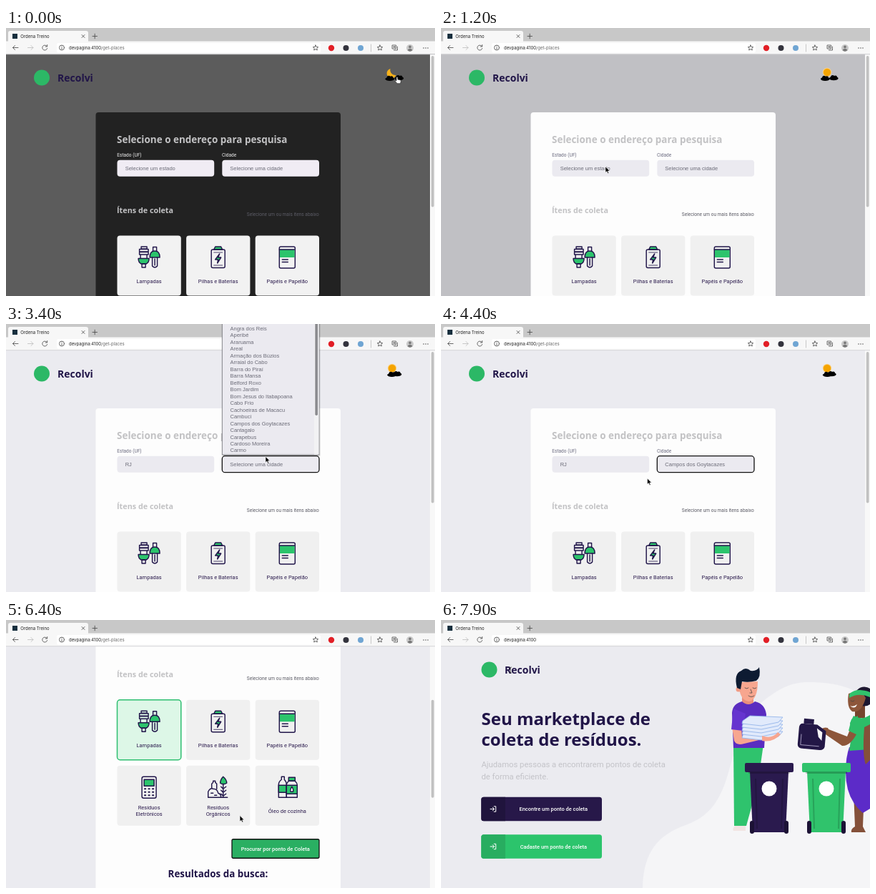
An HTML page for the animation above (8 s loop, 600 by 375 pixels).

```html
<!DOCTYPE html>
<html lang="pt-BR">
<head>
<meta charset="utf-8">
<title>Pontos de coleta</title>
<style>
html, body { margin: 0; width: 100%; height: 100%; overflow: hidden; }
svg { display: block; width: 100vw; height: 100vh; font-family: Roboto, sans-serif; }
.h { font-family: "Open Sans", sans-serif; font-weight: 700; fill: #211548; }
.soft { fill: #c2c2c4; }
.ui { font: 6px Inter, sans-serif; fill: #222; }
.small { font-size: 6.55px; }
.label { fill: #6c6c80; }
.field { font: 7.5px "Liberation Sans", Arial, sans-serif; fill: #6c6c78; }
.box { fill: #ebeaf0; stroke-width: 1.3; }
.focus { stroke: #111; }
.tile { fill: #f0f0f0; stroke-width: 1.5; }
.tile.on { fill: #ddf7e7; stroke: #2fbf71; }
.name { font-size: 7.5px; fill: #2a1a4c; text-anchor: middle; }
.btn { font-size: 7.45px; font-weight: 500; fill: #fff; text-anchor: middle; }
.icon { fill: none; stroke: #21164a; stroke-width: 1.45; stroke-linejoin: round; stroke-linecap: round; }
.icon .g { fill: #2cc46c; }
.line { fill: none; stroke: #444; stroke-width: .8; stroke-linecap: round; stroke-linejoin: round; }
#panel { fill: #fdfdfd; }
.dark #panel { fill: #222; }
.dark .label { fill: #eee; }
.dark .box { fill: #f0ecf4; }
.dark .tile { fill: #f2f2f2; }
</style>
</head>
<body>
<svg id="stage" viewBox="0 0 600 375" preserveAspectRatio="none">
  <defs>
    <g id="cloud"><ellipse rx="6.3" ry="2.7"/><circle cx="-1.5" cy="-2" r="2.6"/><circle cx="2.3" cy="-1.6" r="2.4"/></g>
    <g id="enter" fill="none" stroke="#fff" stroke-linecap="round" stroke-linejoin="round"><path d="M-4 0H1.5M-.8 -2.3L1.5 0L-.8 2.3M1.2 -3.7H3.7V3.7H1.2"/></g>
    <g id="bin">
      <path d="M-27 12H27L23 97H-23Z"/><rect x="-34" width="68" height="13" rx="2"/>
      <path d="M-29 12H29V15H-29Z" fill="#000" opacity=".2"/>
      <path d="M-19 22L-17 92M19 22L17 92" fill="none" stroke="#000" stroke-opacity=".17" stroke-width="2"/>
      <rect x="-27" y="81" width="6" height="18" rx="3" fill="#1c1235"/><rect x="21" y="81" width="6" height="18" rx="3" fill="#1c1235"/>
      <circle cy="36" r="10.5" fill="#fff"/>
    </g>
  </defs>
  <rect id="bg" width="600" height="375"/>

  <g id="find">
    <g id="page">
      <circle cx="50" cy="69.5" r="11" fill="#2cb866"/>
      <text class="h" x="72" y="75" font-size="14">Recolvi</text>
      <path id="moon" d="M537.5 57A6.7 6.7 0 1 0 545.5 66A7.3 7.3 0 0 1 537.5 57Z" fill="#f7b21b"/>
      <g id="sun"><circle cx="540" cy="62" r="6.2" fill="#fbd080"/><circle cx="540" cy="62" r="5.2" fill="#f5a400"/></g>
      <use id="cloudL" href="#cloud" y="71.3"/><use id="cloudR" href="#cloud" y="70.5"/>

      <rect id="panel" x="125.5" y="118" width="342.5" rx="4"/>
      <text class="h soft" x="155" y="161" font-size="13.47">Selecione o endereço para pesquisa</text>
      <text class="small label" x="155.3" y="179.5">Estado (UF)</text>
      <text class="small label" x="302" y="179.5">Cidade</text>
      <rect id="box1" class="box" x="155.5" y="184.7" width="135.7" height="23" rx="4"/>
      <rect id="box2" class="box" x="302.3" y="184.7" width="135.7" height="23" rx="4"/>
      <text id="value1" class="field" x="166.7" y="199"></text>
      <text id="value2" class="field" x="313.3" y="199"></text>
      <text class="h soft" x="155" y="259" font-size="10.8">Ítens de coleta</text>
      <text class="small" x="336.8" y="262.5" fill="#5c5c66">Selecione um ou mais itens abaixo</text>
      <g id="tiles"></g>
      <rect id="search" x="316" y="485.5" width="122" height="26.5" rx="2" fill="#2aaf62" stroke-width="1.3"/>
      <text class="btn" x="376.7" y="501.5">Procurar por ponto de Coleta</text>
      <g id="results" text-anchor="middle">
        <text class="h" x="296.5" y="538.5" font-size="13.4">Resultados da busca:</text>
        <rect x="158" y="558.5" width="108" height="120" rx="5" fill="#ebebf0"/>
        <rect x="327.5" y="558.5" width="108" height="120" rx="5" fill="#ebebf0"/>
        <text class="h" x="212" y="573.2" font-size="8.8">Mercado Tovia</text>
        <text class="h" x="381.5" y="573.2" font-size="8.8">Mercado Tovia</text>
      </g>
    </g>
    <rect x="593" y="37" width="7" height="338" fill="#f8f8f8"/>
    <rect id="thumb" x="594.8" width="3.8" rx="1.9" fill="#c1c1c1"/>
  </g>

  <g id="home">
    <path d="M282 375C283 325 303 301 342 287C391 270 398 228 410 184C420 146 436 122 462 105C480 92 496 87 514 87C555 87 584 96 600 117V375Z" fill="#f5f5f7"/>
    <circle cx="67.5" cy="69.5" r="11" fill="#2cb866"/>
    <text class="h" x="89" y="75" font-size="14">Recolvi</text>
    <g class="h" font-size="24"><text x="56.5" y="147">Seu marketplace de</text><text x="56.5" y="176">coleta de resíduos.</text></g>
    <g font-size="11.25" fill="#c3c3c8"><text x="56.5" y="206">Ajudamos pessoas a encontrarem pontos de coleta</text><text x="56.5" y="223.3">de forma eficiente.</text></g>
    <rect x="56.3" y="247.7" width="168.7" height="33.6" rx="3.500" fill="#271849"/>
    <path d="M90 247.7H59.8A3.500 3.500 0 0 0 56.3 251.200V277.800A3.500 3.500 0 0 0 59.8 281.3H90Z" fill="#20143d"/>
    <rect x="56.3" y="300.2" width="168.7" height="33.6" rx="3.500" fill="#2cc46c"/>
    <path d="M90 300.2H59.8A3.500 3.500 0 0 0 56.3 303.700V330.300A3.500 3.500 0 0 0 59.8 333.8H90Z" fill="#28ad60"/>
    <use href="#enter" x="73" y="264.5"/><use href="#enter" x="73" y="317"/>
    <text class="btn" x="157.3" y="267.2">Encontre um ponto de coleta</text>
    <text class="btn" x="157.3" y="319.7">Cadaste um ponto de coleta</text>

    <!-- man -->
    <path d="M409 174H451L443 230L427 288H410Z" fill="#2fc36d"/>
    <path d="M411 288H426V295H409Q407 292 411 288Z" fill="#f1e4e2"/>
    <path d="M421 101H437V119H421Z" fill="#e98f7c"/>
    <path d="M421 114Q408 117 407 130L409 179H452L455 132Q453 117 439 114Q430 122 421 114Z" fill="#5a2cc0"/>
    <path d="M416 87Q417 113 431 114Q443 111 443 86Z" fill="#f7a68f"/>
    <circle cx="416" cy="97" r="3.500" fill="#f29c86"/>
    <path d="M414 95Q409 75 420 71Q426 65 433 71Q442 72 445 66Q448 80 441 85Q430 88 421 86L419 97Z" fill="#0d1b32"/>
    <path d="M425 95Q428 97 430 95M436 95Q439 97 441 95M430 106Q434 109 438 106M433 97L435 102H432" class="line"/>
    <path d="M407 150L410 169Q413 176 424 173L449 167L448 159L421 163L420 150Z" fill="#f7a68f"/>
    <path d="M409 124L406 153L422 155L426 131Z" fill="#6534cf"/>
    <g id="papers" stroke="#96b6ea" stroke-width=".9" fill="#e1eafb"></g>
    <path d="M449 162Q463 167 471 157L475 160Q464 172 449 169Z" fill="#f7a68f"/>

    <!-- woman -->
    <path d="M577 240H592L590 289L594 297H574Q573 292 579 289Z" fill="#84503a"/>
    <path d="M571 178H600V264L590 270Q566 250 566 213Q566 192 571 178Z" fill="#5c2bc8"/>
    <path d="M579 116H593V137H579Z" fill="#76442d"/>
    <circle cx="592" cy="107" r="13.500" fill="#1d1730"/>
    <path d="M570 103Q567 122 575 128Q588 131 594 109L587 98Z" fill="#8d563a"/>
    <path d="M571 104Q580 94 600 101V108Q584 101 571 109Z" fill="#30c36c"/>
    <path d="M573 113Q576 115 578 113" class="line"/>
    <path d="M572 120Q577 122 582 118Q579 126 572 120Z" fill="#fff"/>
    <path d="M577 134Q588 141 600 133V181L571 183Q575 160 572 144Z" fill="#2dbd68"/>
    <path d="M575 146L568 163L537 151L532 156L561 176Q573 177 583 156Z" fill="#8d563a"/>
    <path d="M583 134L574 139L570 155L583 161Z" fill="#2dbd68"/>
    <path d="M592 150L600 146V196L594 202Q589 190 592 150Z" fill="#84503a"/>
    <path d="M530 157Q532 149 541 151L544 157L534 162Z" fill="#8d563a"/>
    <g fill="#231746" transform="rotate(5 520 161)">
      <path d="M506 139H520V146H506Z"/><path d="M504 146H525L538 154V176Q537 181 531 181H505Q500 180 500 175V152Q500 147 504 146Z"/>
      <path d="M525 151L533 156V168L528 163Z" fill="#f5f5f7"/><path d="M504 161V176H530" fill="none" stroke="#cfc8e6" stroke-width=".7"/>
    </g>
    <use href="#bin" x="459" y="200" fill="#2a1a4e"/>
    <use href="#bin" x="539" y="200" fill="#30c36c"/>
  </g>

  <!-- browser frame -->
  <rect width="600" height="19" fill="#c8c8c8"/>
  <rect y="18.500" width="600" height="18" fill="#f7f7f7"/>
  <rect y="36.300" width="600" height=".9" fill="#d2d2d4"/>
  <path d="M3 19V7Q3 4 6 4H112Q115 4 115 7V19Z" fill="#f7f7f7"/>
  <rect x="9" y="8" width="7" height="7" fill="#17303f"/>
  <text class="ui" x="20.3" y="13.7">Ordena Treino</text>
  <path class="line" d="M106 9.5L110 13.5M110 9.5L106 13.5M121 11.5H127.500M124.200 8.200V14.800"/>
  <rect x="71" y="21" width="369" height="13.500" rx="2.500" fill="#fff"/>
  <text class="ui" x="88" y="30"><tspan>devpagina:4100</tspan><tspan id="path" fill="#666">/get-places</tspan></text>
  <path class="line" d="M17 27.500H9.500M12.500 24.500L9.500 27.500L12.500 30.500M57 25.300A3.500 3.500 0 1 0 57.700 28.500M57.700 23.500V26H55.200M78 27.200V29.500M78 25.600V25.700"/>
  <path class="line" style="stroke:#bbb" d="M30.500 27.500H38M35 24.500L38 27.500L35 30.500M510.500 23V33"/>
  <circle class="line" cx="78" cy="27.500" r="3.500"/>
  <path id="star" class="line" d="M433 24L434.100 26.400L436.700 26.700L434.800 28.400L435.300 31L433 29.700L430.700 31L431.200 28.400L429.300 26.700L431.900 26.400Z"/>
  <use href="#star" x="90"/>
  <circle cx="455" cy="28" r="4.200" fill="#e21f26"/>
  <circle cx="475.500" cy="28" r="4" fill="#33333d"/>
  <circle cx="496" cy="28" r="4" fill="#6fa5d3"/>
  <path class="line" d="M540.500 24H545.500V29H540.500ZM542.500 31H547.500V26M543 25.300V27.700M541.800 26.500H544.200"/>
  <circle cx="565" cy="28" r="5" fill="#c9c9c9"/><circle cx="565" cy="26.400" r="1.800" fill="#777"/><path d="M561.500 31Q565 26.500 568.500 31Q565 34.500 561.500 31Z" fill="#777"/>
  <path d="M584 28h.01M587 28h.01M590 28h.01" stroke="#333" stroke-width="1.300" stroke-linecap="round"/>

  <g id="list">
    <rect x="1.500" y="-3" width="136" height="187.500" opacity=".15"/>
    <rect x=".3" y="-2" width="135.600" height="185" fill="#ebeaf0" stroke="#77777c" stroke-width=".9"/>
    <rect id="hover" x=".8" width="128.200" height="9.500" fill="#c4c4c6"/>
    <g id="items"></g>
    <path d="M129 0V182.500H135.500V0Z" fill="#f2f2f4"/>
    <rect x="130.300" y="-3" width="3.700" height="131" rx="1.800" fill="#8c8c90"/>
  </g>

  <g id="cursor" stroke="#fff" stroke-width=".6">
    <path id="arrow" d="M0 0V8.300L1.900 6.600L3.300 9.500L4.700 8.900L3.400 6.100H6Z"/>
    <path id="hand" d="M-1 0Q0 -1.200 .9 0V3L4.400 3.800Q5.600 4.200 5.300 5.600L4.600 8.700H.2L-2.800 5.400Q-2.600 4 -1 5Z" fill="#fff" stroke="#111"/>
    <path id="beam" d="M-1.700 -4Q0 -4 0 -2.800V2.800Q0 4 -1.700 4M1.700 -4Q0 -4 0 -2.800M0 2.800Q0 4 1.700 4" fill="none" stroke="#222" stroke-width=".8"/>
  </g>
</svg>

<script>
const $ = id => document.getElementById(id);
const set = (id, attrs) => { for (const k in attrs) $(id).setAttribute(k, attrs[k]); };
const show = (id, on) => { $(id).style.display = on ? '' : 'none'; };
const clamp = x => Math.max(0, Math.min(1, x));
const ease = x => { x = clamp(x); return x * x * (3 - 2 * x); };

const LOOP = 8000, STEP = 100, ROW = 9.47, DEPTH = 199.5;
const states = 'RO AC AM RR PA AP TO MA PI CE RN PB PE AL SE BA MG ES RJ'.split(' ');
const cities = ('Angra dos Reis,Aperibé,Araruama,Areal,Armação dos Búzios,Arraial do Cabo,Barra do Piraí,' +
  'Barra Mansa,Belford Roxo,Bom Jardim,Bom Jesus do Itabapoana,Cabo Frio,Cachoeiras de Macacu,' +
  'Cambuci,Campos dos Goytacazes,Cantagalo,Carapebus,Cardoso Moreira,Carmo').split(',');

// Each icon is centred on 0,0.
const tiles = [
  [['Lampadas'], `<path d="M-11 -15H-3V-12H-11ZM-13.500 -11.500H-1V-8H-13.500ZM-13.500 -7.500H-1V-4H-13.500ZM-12 -3.500V1M-3 -3.500V1"/>
    <path class="g" d="M-15 1.500H0Q0 7 -4 9H-11Q-15 7 -15 1.500Z"/><path d="M-10 9H-5V14H-10Z"/>
    <path class="g" d="M1 0Q1 -9 8 -9T15 0Z"/><path d="M5.500 -9V-14.500H10.500V-9M4.500 0V12Q8 16 11.500 12V0M8 2V11"/>`],
  [['Pilhas e Baterias'], `<path class="g" d="M-4 -15H4L6 -11H-6Z"/><rect x="-9.500" y="-11" width="19" height="25.500" rx="2"/>
    <path stroke-width=".8" d="M-6 -7H6M-6 11H6"/><path class="g" d="M2 -5L-4 3H0L-1 8L4 0H0Z"/>`],
  [['Papéis e Papelão'], `<rect x="-11" y="-15" width="22" height="30" rx="2"/>
    <path class="g" stroke="none" d="M-10.300 -11H10.300V0H-10.300Z"/><path d="M-7 3H1M-7 6.500H1M-11 -11H10"/>`],
  [['Resíduos', 'Eletrônicos'], `<rect x="-10" y="-15" width="20" height="30" rx="2.500"/><path class="g" d="M-7 -11H7V-2H-7Z"/>
    <path stroke-width="2.200" d="M-6 2h1M-.500 2h1M5 2h1M-6 6.500h1M-.500 6.500h1M5 6.500h1M-6 11h1M-.500 11h1M5 11h1"/>`],
  [['Resíduos', 'Orgânicos'], `<path class="g" d="M3 -6Q3 -11 7 -15Q12 -11 12 -6Q7 -3 3 -6Z"/>
    <path d="M7 -5V13M4 -1L7 2L11 -1M4 4L7 7L11 4M4 9L7 12L11 9M-14 14V6Q-11 0 -7 2Q-1 2 0 8Q4 9 4 14ZM-14 14H13M-9 1V-5L-7 -7V-9H-4V-7L-2 -5V2M-10 8H-7M-5 11H-2"/>`],
  [['Óleo de cozinha'], `<path d="M-8 -15H-4V-11Q-1 -8 -1 -4V14H-12V-4Q-12 -8 -8 -11Z"/><path class="g" d="M-12 -3H-1V7H-12Z"/>
    <path class="g" d="M2 -14H11V-9H2Z"/><path d="M2 -9H11Q14 -6 14 -3V14H-1V-3Q-1 -6 2 -9Z"/>
    <path class="g" d="M-1 -3H14V9H-1Z"/><path fill="#fff" d="M6.500 -1Q3.500 4 5 6H8Q9.500 4 6.500 -1Z"/>`]
];
$('tiles').innerHTML = tiles.map(([lines, icon], i) => {
  const x = 155.5 + i % 3 * 96.6, row = i / 3 | 0, y = 290.5 + row * 92, mid = x + 44.6;
  const base = row ? y + (lines.length > 1 ? 61.5 : 66.5) : y + 66.3;
  return `<rect class="tile" ${i ? '' : 'id="lamp"'} x="${x}" y="${y}" width="89.3" height="84" rx="4"/>
    <g class="icon" transform="translate(${mid} ${y + 30.5})">${icon}</g>` +
    lines.map((s, n) => `<text class="name" x="${mid}" y="${base + n * 9}">${s}</text>`).join('');
}).join('');

for (let i = 0; i < 5; i++) {
  const y = 168 - i * 5;
  $('papers').innerHTML += `<path d="M422 ${y - 7}L432 ${y - 14}L478 ${y - 12}L472 ${y - 5}L448 ${y}L421 ${y - 3}Z"/>`;
}

// time, x, y
const route = [
  [0, 547, 69], [300, 547, 69], [800, 228, 179.5], [1200, 230, 194], [1500, 230, 194],
  [2200, 202, 176], [2600, 202, 176], [3100, 365, 194], [3300, 365, 194], [3700, 352, 139],
  [3900, 352, 139], [4300, 288.5, 216], [4500, 288.5, 216], [4850, 200, 133], [5000, 200, 133],
  [5350, 345, 297], [5600, 345, 297], [5900, 337.5, 280], [6300, 337.5, 280], [6800, 237, 218.5],
  [7000, 237, 218.5], [7500, 97, 70], [8000, 97, 70]
];
function cursorAt(t) {
  const i = route.findIndex(p => p[0] > t), a = route[i - 1], b = route[i];
  const k = ease((t - a[0]) / (b[0] - a[0]));
  return [a[1] + (b[1] - a[1]) * k, a[2] + (b[2] - a[2]) * k];
}

let listed;
function drawList(names, x, y) {
  show('list', names);
  if (names && names !== listed) {
    set('list', { transform: `translate(${x} 0)` });
    $('items').innerHTML = names.map((s, i) => `<text class="field" x="11.500" y="${9 + i * ROW}">${s}</text>`).join('');
  }
  listed = names;
  const row = Math.round((y - 6.5) / ROW);
  show('hover', row < 19);
  set('hover', { y: 2.4 + row * ROW });
}

function draw(t) {
  const within = (a, b) => t >= a && t < b;
  const light = t >= 400, found = t >= 5700, home = t >= 7600;
  const fade = clamp((t - 400) / 1140);
  const shade = to => Math.round(92 + (to - 92) * fade);
  set('bg', { fill: `rgb(${shade(235)},${shade(235)},${shade(240)})` });
  $('stage').classList.toggle('dark', !light);
  show('find', !home);
  show('home', home);
  show('path', !home);
  show('moon', !light);
  show('sun', light);

  const drift = 4.75 + 1.75 * Math.cos(2 * Math.PI * t / 9500);
  set('cloudL', { x: 543.3 - drift });
  set('cloudR', { x: 543.3 + drift });

  const scroll = DEPTH * (ease((t - 4400) / 100) - ease((t - 6300) / 500));
  const height = found ? 829 : 537;
  set('page', { transform: `translate(0 ${-scroll})` });
  set('panel', { height: found ? 720 : 424 });
  set('thumb', { y: 39 + scroll * 337 / height, height: 337 * 337 / height });
  show('results', found);

  $('value1').textContent = t >= 2600 ? 'RJ' : 'Selecione um estado';
  $('value2').textContent = t >= 3900 ? cities[14] : 'Selecione uma cidade';
  $('box1').classList.toggle('focus', within(1400, 3200));
  $('box2').classList.toggle('focus', within(3200, 4900));
  $('lamp').classList.toggle('on', t >= 4900);
  $('search').classList.toggle('focus', within(5400, 6900));

  const [x, y] = cursorAt(t);
  drawList(within(1400, 2600) ? states : within(3200, 3900) ? cities : null, t < 2600 ? 155.3 : 302, y);
  set('cursor', { transform: `translate(${x} ${y})` });
  const hand = t < 400 || within(4800, 5100) || within(5300, 5700), beam = t >= 7500;
  show('hand', hand);
  show('beam', beam);
  show('arrow', !hand && !beam);
}

const start = performance.now();
(function tick() {
  const t = (performance.now() - start) % LOOP;
  draw(Math.floor(t / STEP) * STEP);
  requestAnimationFrame(tick);
})();
</script>
</body>
</html>
```
